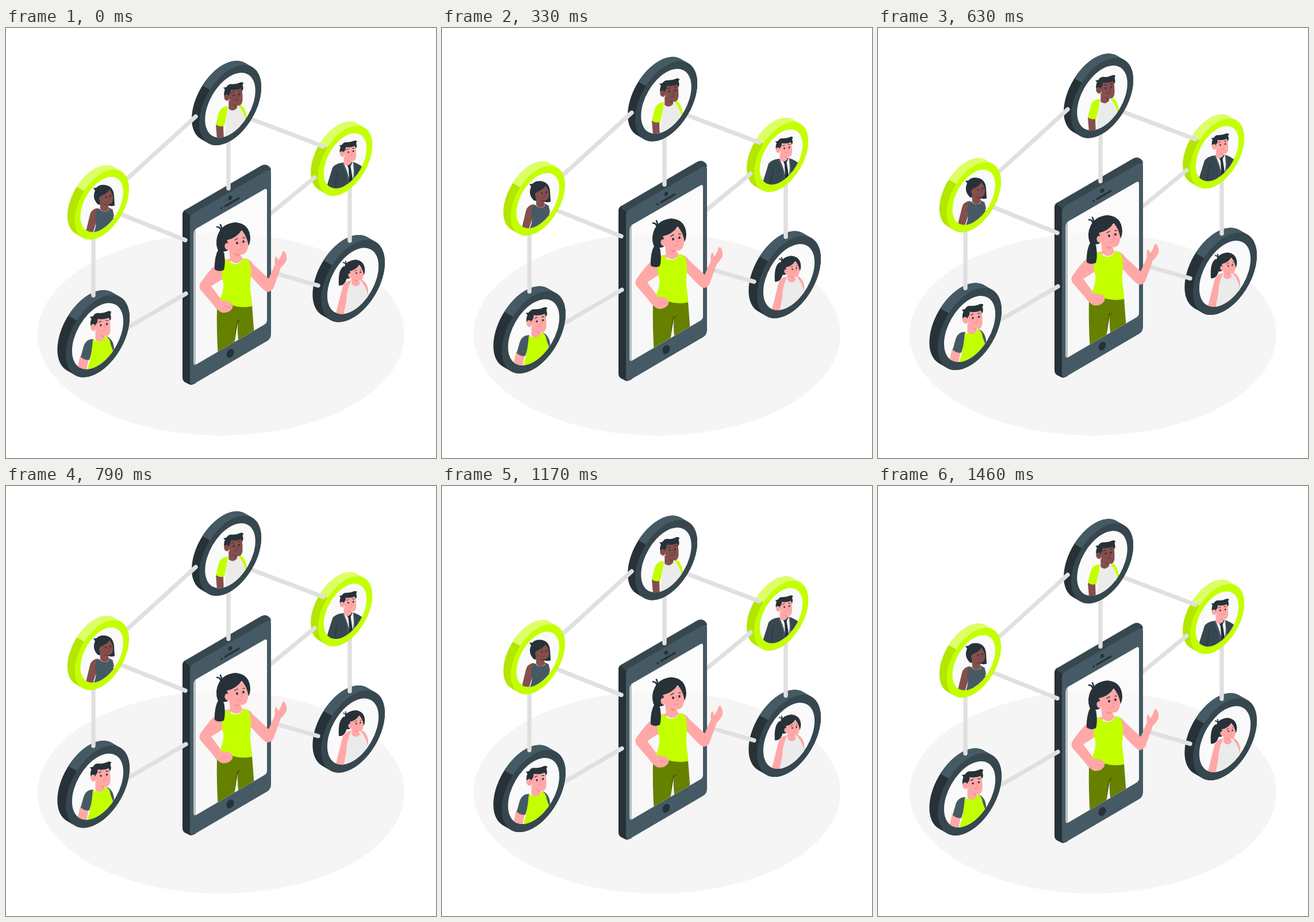
Animation, 748 px wide and 748 px high, one loop 1.5 s. Source, as an HTML page with a canvas:

```html
<!DOCTYPE html>
<html lang="en">
<head>
<meta charset="utf-8">
<title>Connected people</title>
<style>
  html, body { margin: 0; width: 100%; height: 100%; overflow: hidden; background: #fff; }
  canvas { display: block; width: 748px; height: 748px; }
</style>
</head>
<body>
<canvas id="stage" width="748" height="748"></canvas>
<script>
const ctx = document.getElementById('stage').getContext('2d');
const LOOP = 1500, FPS = 24, RISE = 15;
const INK = '#263238', SLATE = '#37474f', STEEL = '#455a64', LIME = '#c4ff00';
const PINK = '#ffa8a7', BROWN = '#854f4d', CLOTH = '#ebebeb', ROD = '#e0e0e0';
const DARK_DISC = { side: INK, top: STEEL, front: SLATE };
const LIME_DISC = { side: '#b3e600', top: '#dcff66', front: LIME };

function fill(color, d) {
  ctx.fillStyle = color;
  ctx.fill(new Path2D(d), 'evenodd');
}
function line(color, width, d) {
  ctx.strokeStyle = color;
  ctx.lineWidth = width;
  ctx.lineCap = 'round';
  ctx.stroke(new Path2D(d));
}
function oval(color, x, y, rx, ry = rx, turn = 0) {
  ctx.fillStyle = color;
  ctx.beginPath();
  ctx.ellipse(x, y, rx, ry, turn, 0, 7);
  ctx.fill();
}
function scoped(draw) {
  ctx.save();
  draw();
  ctx.restore();
}
function rod(x1, y1, x2, y2) {
  line(ROD, 7.4, `M${x1} ${y1}L${x2} ${y2}`);
}

// Circle lying in the left-facing isometric plane.
function isoArc(x, y, r, from = 0, to = 2 * Math.PI) {
  scoped(() => {
    ctx.transform(.866, -.5, 0, 1, x, y);
    ctx.arc(0, 0, r, from, to);
  });
}
function disc(x, y, r, inner, depth, tone, portrait) {
  const q = Math.PI / 4;
  const hull = () => {
    ctx.beginPath();
    isoArc(x, y, r, -q, 3 * q);
    isoArc(x - depth * .866, y - depth * .5, r, 3 * q, 7 * q);
    ctx.closePath();
  };
  hull();
  ctx.fillStyle = tone.side;
  ctx.fill();
  scoped(() => {
    hull();
    ctx.clip();
    const edge = s => y - .1 * r + s * 100 * .577;
    fill(tone.top, `M${x - 100} ${edge(-1)}L${x + 100} ${edge(1)}V${y - 100}H${x - 100}Z`);
  });
  ctx.beginPath();
  isoArc(x, y, r);
  ctx.fillStyle = tone.front;
  ctx.fill();
  scoped(() => {
    ctx.beginPath();
    isoArc(x, y, inner);
    ctx.fillStyle = '#fafafa';
    ctx.fill();
    ctx.clip();
    portrait();
  });
}

function manHead(x, y, scale, skin, shade) {
  scoped(() => {
    ctx.translate(x, y);
    ctx.scale(scale, scale);
    fill(skin, 'M10 34L10 50Q18 57 26 48L25 42Z');
    fill(shade, 'M17 40Q20 45 26 46L26 43Z');
    fill(INK, 'M4 31Q-1 24 3 14L0 10Q5 11 7 8Q10 3 17 4Q25 4 31 1Q35 -1 38 2Q35 5 37 9Q38 14 35 17L20 24Z');
    fill(skin, 'M10 23Q13 19 13 14Q25 16 33 12Q36 15 36 28Q37 44 28 44Q17 43 12 36Z');
    oval(skin, 6.5, 29, 5, 6, -.3);
    line(shade, 1, 'M4 27Q7 27 8 31M26 22L28 29L25 30');
    fill(INK, 'M9 26L9 14H14Q14 21 11 23Z');
    oval(INK, 19.5, 25, 1.6, 1.9);
    oval(INK, 30, 23, 1.6, 1.9);
    line(INK, 1.2, 'M16 20L20 18M28 17L32 17');
    line(shade, 1.2, 'M21 34Q25 35 28 33');
  });
}
function womanHead() {
  fill(PINK, 'M388 384L390 404Q401 415 412 402L406 391Z');
  fill('#f28f8f', 'M396 391Q402 394 408 393Q404 398 400 396Z');
  fill(PINK, 'M384 362L418 352Q424 366 421 381Q419 394 409 394Q396 393 389 388Q382 380 384 362Z');
  fill(INK, 'M386 387Q376 392 368 385Q363 370 370 356Q378 340 399 338Q424 340 425 366Q425 373 422 379Q419 361 410 352Q400 366 384 369Q388 374 386 387Z');
  oval(PINK, 385, 380, 4.5, 6, -.2);
  line(INK, 2.6, 'M374 353Q373 346 367 346M376 350L373 342');
  oval(INK, 402, 374, 1.9, 2.3);
  oval(INK, 413, 371.5, 1.9, 2.3);
  line(INK, 1.3, 'M398 369L403 366M412 365L415 365');
  line('#f28f8f', 1.3, 'M408 371L411 378L408 379M403 385Q407 387 410 384');
}

function topMan() {
  fill(BROWN, 'M365 168Q372 172 378 170L379 198L367 192Z');
  fill(CLOTH, 'M384 137Q397 143 406 134Q414 139 417 160L422 175L379 207Q383 165 384 137Z');
  fill(LIME, 'M386 136Q374 136 370 148L365 168Q372 173 380 170L384 150Z');
  fill(LIME, 'M403 134Q415 131 419 155L418 164Q413 143 403 134Z');
  manHead(378, 94, .93, BROWN, '#643c3b');
}
function suitMan() {
  fill(SLATE, 'M587 234Q572 236 568 243L554 288L610 294L624 245Q614 236 604 233Z');
  fill('#f5f5f5', 'M587 234L598 243L604 232L607 264L603 282L592 246Z');
  fill(INK, 'M594 239L599 238L600 244L604 268L600 278L597 266L596 245Z');
  line(INK, 1, 'M576 252L571 282');
  line(STEEL, 2, 'M586 236L593 252L597 276M605 235L606 250L604 270');
  manHead(579.5, 195.5, .82, PINK, '#f28f8f');
}
function limeMan() {
  fill(PINK, 'M129 570L144 575L138 605L122 602Z');
  fill(STEEL, 'M152 541Q139 541 135 554L130 572Q137 579 145 577L152 555Z');
  fill(STEEL, 'M174 536Q186 540 188 556L186 572L178 548Z');
  fill(LIME, 'M151 542Q164 548 174 536Q181 540 182 550L190 572L170 602L137 607Q149 575 151 542Z');
  manHead(145.5, 492, 1, PINK, '#f28f8f');
}
function bobWoman() {
  fill(BROWN, 'M160 313Q148 315 146 325L137 362L148 366L158 335Z');
  fill(BROWN, 'M178 312Q187 314 188 327L184 332Z');
  fill(STEEL, 'M157 316L162 314Q172 325 181 314L186 316Q184 329 191 340L180 362L148 364Q160 345 155 330Z');
  fill(INK, 'M160 307Q149 296 155 283L152 278L157 278Q162 272 172 273Q187 275 188 292L189 309Q182 311 176 308Z');
  fill(BROWN, 'M163 300L164 315Q172 324 179 315L177 304Z');
  fill(BROWN, 'M165 292Q176 288 180 281Q187 289 186 299Q184 307 178 307Q165 305 165 292Z');
  fill('#643c3b', 'M169 306Q173 309 178 309L177 307Z');
  oval(BROWN, 165, 297, 3, 4);
  oval(INK, 174, 294, 1.3, 1.6);
  oval(INK, 182, 292, 1.3, 1.6);
  line('#643c3b', 1, 'M179 292L181 297L179 298M174 302Q177 303 179 301');
}
function ponytailWoman() {
  fill(INK, 'M588 414Q577 420 579 448Q588 449 592 438Q594 428 590 420Z');
  fill(CLOTH, 'M597 441Q606 446 614 438L624 443Q628 460 632 470L610 502L587 508Q594 470 592 452Z');
  fill(PINK, 'M601 439Q588 440 585 452L573 500L586 507L592 475Q592 455 601 439Z');
  fill(PINK, 'M613 436Q626 438 630 454L630 465Q624 444 613 436Z');
  scoped(() => {
    ctx.translate(586, 403);
    ctx.scale(.65, .65);
    ctx.translate(-366, -338);
    womanHead();
  });
}

const SCREEN = 'M326 358Q326 352 331 349L449 281Q454 278 454 284V508Q454 513 449 516L331 585Q326 588 326 582Z';

function phone() {
  fill(INK, 'M307 324Q307 319 312 316L330 314V618L325 620Q321 622 317 619L311 616Q307 613 307 608Z');
  fill(SLATE, 'M309 318L443 240Q450 236 455 239Q461 242 461 248L330 336L320 326Z');
  fill(STEEL, 'M320 333Q320 326 326 322L452 249Q461 245 461 252V532Q461 540 455 544L327 619Q320 622 320 614Z' + SCREEN);
  scoped(() => {
    ctx.globalAlpha = .7;
    fill('#fafafa', SCREEN);
  });
  oval(INK, 390, 295.5, 3.2, 4, .5);
  line(INK, 3.4, 'M381 310L405 296');
  oval(INK, 375, 313.5, 1.7, 2.1, .5);
  oval(INK, 390, 566, 6, 8.2, .45);
}
function mainWoman() {
  scoped(() => {
    ctx.clip(new Path2D(SCREEN));
    fill('#668000', 'M367 484Q366 480 372 476L428 482L432 536L405 552Q402 525 403 512Q399 522 397 554L369 572Q366 530 367 484Z');
    fill('#4d6000', 'M414 506L402 509Q398 525 398 546Q400 529 403 513Q406 508 414 506Z');
  });
  fill(PINK, 'M417 401Q425 403 430 411L457 436L468 411Q466 402 470 397Q473 400 473 405Q479 397 481 389Q484 386 486 391Q489 396 488 404Q483 413 478 417L465 453Q461 459 454 459Q449 458 426 432Z');
  fill(PINK, 'M376 406Q384 400 392 402L379 435L357 449L374 472L368 485L362 483L338 455Q334 448 340 441Q352 424 362 414Q368 408 376 406Z');
  fill(LIME, 'M386 401C390 413 408 414 413 400Q421 401 424 408Q428 424 425 442Q424 452 428 476L428 484Q398 490 372 472Q380 456 378 442Q373 430 376 417Q378 407 386 401Z');
  fill(PINK, 'M369 473Q378 474 388 476Q396 480 394 487Q388 497 375 495Q366 490 361 482Z');
  line('#f28f8f', 1, 'M379 483Q384 486 390 486M474 405Q475 408 478 409');
  womanHead();
  fill(INK, 'M370 384Q380 386 380 396Q382 410 379 421Q370 425 363 420Q362 398 370 384Z');
}

function scene() {
  disc(603.5, 440, 64, 51.5, 17, DARK_DISC, ponytailWoman);
  rod(598, 275, 598, 370);
  rod(459, 424, 543, 448);
  disc(590, 231, 54.4, 43, 14.8, LIME_DISC, suitMan);
  rod(537, 260, 459, 324);
  rod(415, 154, 552, 206);
  phone();
  rod(387, 190, 387, 279);
  rod(190, 320, 312, 369);
  rod(205, 525, 313, 462);
  mainWoman();
  disc(390, 134.2, 62.4, 50.5, 14.9, DARK_DISC, topMan);
  rod(330, 154, 200, 272);
  disc(159.5, 536, 64, 51.5, 17, DARK_DISC, limeMan);
  rod(152, 350, 152, 465);
  disc(166.7, 307, 54.4, 43, 14.8, LIME_DISC, bobWoman);
}

function frame(now) {
  const step = Math.floor((now % LOOP + 5) * FPS / 1000);
  const phase = (step / FPS + .03) / (LOOP / 1000) % 1;
  const lift = RISE * (1 - Math.abs(2 * phase - 1));
  ctx.fillStyle = '#fff';
  ctx.fillRect(0, 0, 748, 748);
  oval('#f5f5f5', 374, 533, 319, 176);
  scoped(() => {
    ctx.translate(0, .6 - lift);
    scene();
  });
  requestAnimationFrame(frame);
}
requestAnimationFrame(frame);
</script>
</body>
</html>
```
